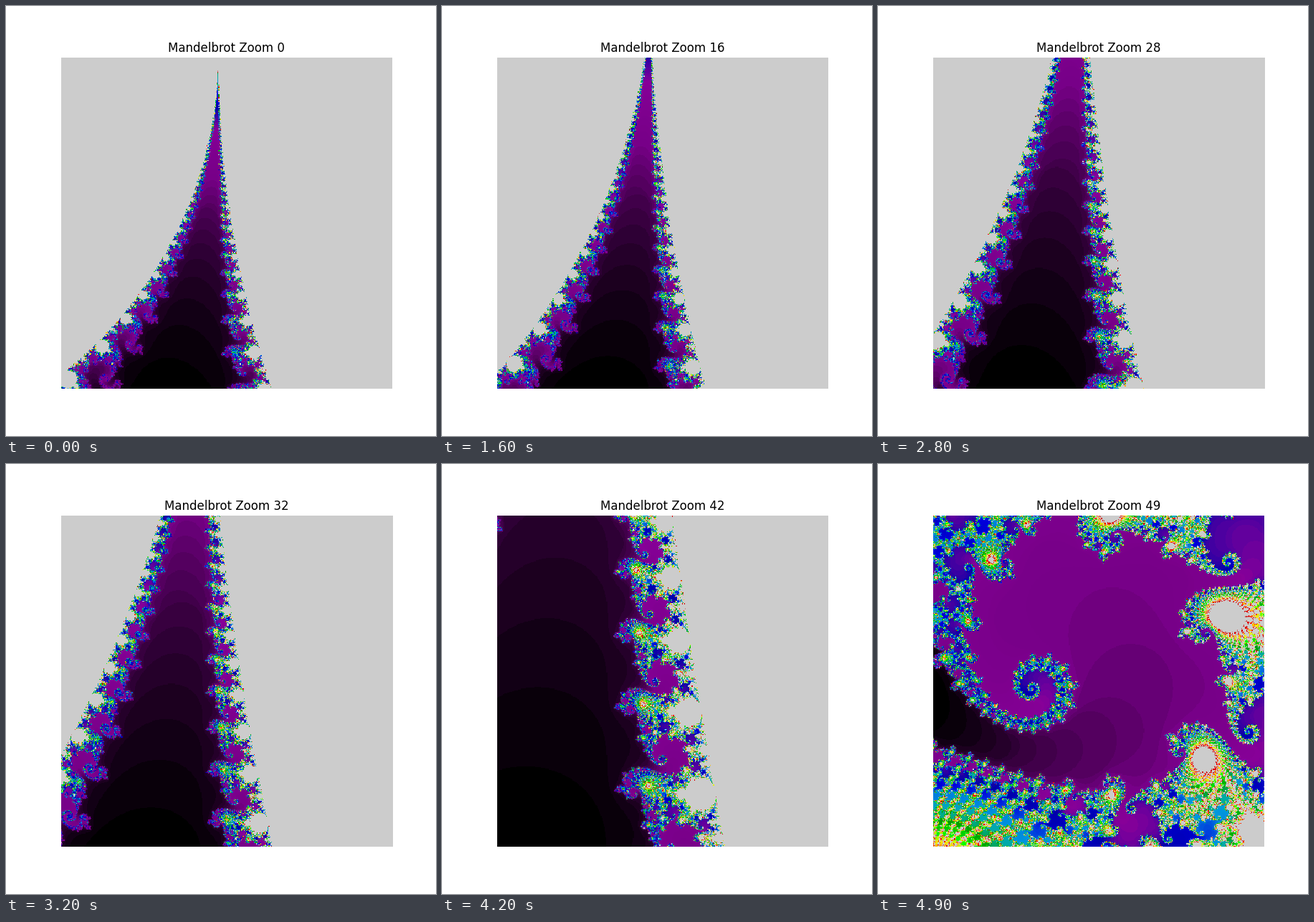
Recreate the animation shown at these times as a matplotlib script. Size 600 by 600 pixels, loop 5000 ms.

```python
import numpy as np
import matplotlib.pyplot as plt
from matplotlib.animation import FuncAnimation

CENTER_X, CENTER_Y = -0.745, 0.105
HALF_WIDTH = 0.1
GRID = 400
MAX_ITER = 500
CHUNK = 10
FRAMES = 50


def inside_main_bodies(c):
    """True where c lies in the main cardioid or the period-2 disk."""
    x, y2 = c.real, c.imag ** 2
    q = (x - 0.25) ** 2 + y2
    return (q * (q + x - 0.25) <= 0.25 * y2) | ((x + 1) ** 2 + y2 <= 0.0625)


def escape_counts(xmin, xmax, ymin, ymax):
    x = np.linspace(xmin, xmax, GRID)
    y = np.linspace(ymin, ymax, GRID)
    c = (x[None, :] + 1j * y[:, None]).ravel()
    counts = np.full(c.size, MAX_ITER)
    active = np.flatnonzero(~inside_main_bodies(c))
    c = c[active]
    z = np.zeros_like(c)
    n = np.zeros(c.size, dtype=int)

    # Escaped points are dropped once per chunk, which is faster than every step.
    with np.errstate(all="ignore"):
        for _ in range(MAX_ITER // CHUNK):
            for _ in range(CHUNK):
                n += z.real ** 2 + z.imag ** 2 <= 4
                z *= z
                z += c
            counts[active] = n
            alive = z.real ** 2 + z.imag ** 2 <= 4
            active, c, z, n = active[alive], c[alive], z[alive], n[alive]
            if not active.size:
                break
    return counts.reshape(GRID, GRID)


fig, ax = plt.subplots(figsize=(6, 6), dpi=100)


def update(frame):
    half = HALF_WIDTH * (1 - frame / FRAMES)
    bounds = (CENTER_X - half, CENTER_X + half,
              CENTER_Y - half, CENTER_Y + half)
    ax.clear()
    ax.imshow(escape_counts(*bounds), cmap="nipy_spectral",
              extent=bounds, interpolation="nearest")
    ax.set_title(f"Mandelbrot Zoom {frame}")
    ax.axis("off")
    return ax.get_children()


anim = FuncAnimation(fig, update, frames=FRAMES, interval=100,
                     init_func=lambda: [], repeat=True, repeat_delay=0)
plt.show()
```
